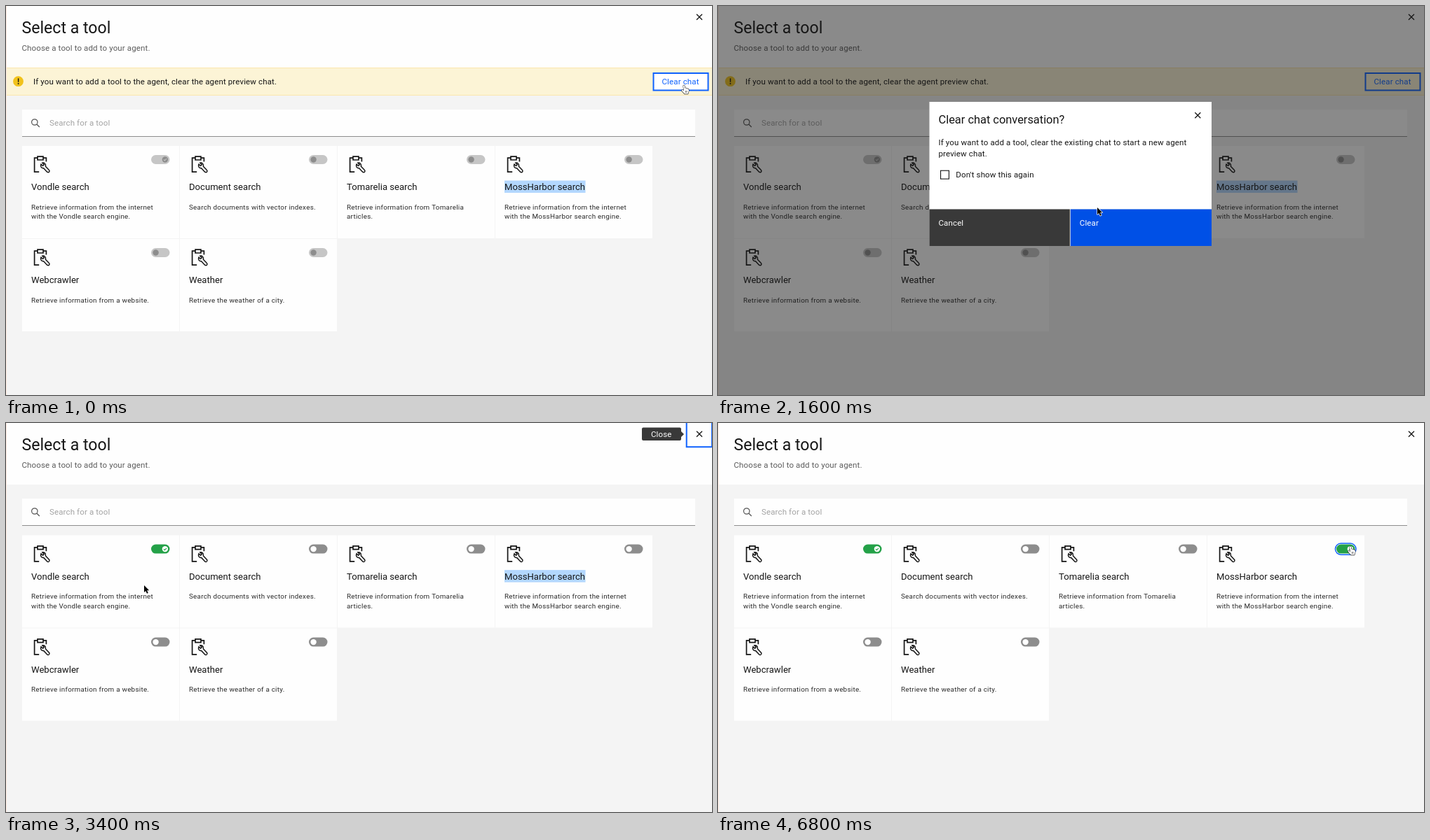
Recreate the animation shown at these times as an HTML page with a canvas. Size 1007 by 556 pixels, loop 7000 ms.

```html
<!DOCTYPE html>
<html lang="en">
<head>
<meta charset="utf-8">
<title>Select a tool</title>
<style>
html, body { margin: 0; width: 100%; height: 100%; overflow: hidden; background: #f4f4f4; }
canvas { display: block; width: 1007px; height: 556px; }
</style>
</head>
<body>
<canvas id="stage"></canvas>
<script>
const W = 1007, H = 556, LOOP = 7000, STEP = 200;
const BLUE = '#0f62fe', INK = '#161616';
const ratio = window.devicePixelRatio || 1;
const stage = document.getElementById('stage');
const layer = document.createElement('canvas');
for (const c of [stage, layer]) {
  c.width = W * ratio;
  c.height = H * ratio;
  c.getContext('2d').scale(ratio, ratio);
}
const main = stage.getContext('2d');
const over = layer.getContext('2d');
let g = main;

// size and letter spacing of each text style
const STYLES = {
  title: [23.1, 0], dialog: [16.4, 0], card: [13.1, 0], body: [11.5, 0.13], small: [9.85, 0.26]
};

const TOOLS = [
  ['Vondle search', 'Retrieve information from the internet', 'with the Vondle search engine.'],
  ['Document search', 'Search documents with vector indexes.'],
  ['Tomarelia search', 'Retrieve information from Tomarelia', 'articles.'],
  ['MossHarbor search', 'Retrieve information from the internet', 'with the MossHarbor search engine.'],
  ['Webcrawler', 'Retrieve information from a website.'],
  ['Weather', 'Retrieve the weather of a city.']
];

// time, x, y of the pointer tip
const PATH = [
  [0, 966, 113], [1200, 966, 113], [1600, 541, 288], [2000, 578, 322], [2400, 583, 328],
  [3000, 583, 328], [3400, 197, 232], [3800, 202, 226], [4800, 646, 201], [5200, 901, 176], [7000, 901, 176]
];

function setFont(style) {
  const [size, gap] = STYLES[style];
  g.font = `${size}px Roboto, "Noto Sans", sans-serif`;
  g.letterSpacing = gap + 'px';
}

function text(str, x, y, style = 'body', color = INK) {
  setFont(style);
  g.fillStyle = color;
  g.fillText(str, x, y);
}

function box(x, y, w, h, color) {
  g.fillStyle = color;
  g.fillRect(x, y, w, h);
}

function frame(x, y, w, h, color, width) {
  g.strokeStyle = color;
  g.lineWidth = width;
  g.strokeRect(x + width / 2, y + width / 2, w - width, h - width);
}

function disc(x, y, r, color) {
  g.fillStyle = color;
  g.beginPath();
  g.arc(x, y, r, 0, 7);
  g.fill();
}

function pill(x, y, w, h, color, r = h / 2) {
  g.fillStyle = color;
  g.beginPath();
  g.roundRect(x, y, w, h, r);
  g.fill();
}

function line(d, color, width) {
  g.strokeStyle = color;
  g.lineWidth = width;
  g.stroke(new Path2D(d));
}

function cross(x, y) {
  line(`M${x - 4} ${y - 4}l8 8m0 -8l-8 8`, INK, 1.3);
}

function toggle(x, y, on, enabled, focus) {
  if (focus) {
    pill(x - 2.3, y - 2.3, 31.1, 17.6, BLUE);
    pill(x - 0.8, y - 0.8, 28.1, 14.6, '#fff');
  }
  const track = !enabled ? '#c6c6c6' : on ? '#24a148' : '#8d8d8d';
  pill(x, y, 26.5, 13, track);
  const cx = x + (on ? 19.9 : 6.6), cy = y + 6.5;
  disc(cx, cy, 4.2, enabled ? '#fff' : '#8d8d8d');
  if (on) line(`M${cx - 2} ${cy}l1.5 1.5l2.6 -2.8`, track, 1.1);
}

function toolIcon(x, y) {
  g.save();
  g.translate(x, y);
  line('M6 3.2H1.6V23.2H8.2M14 3.2H18.4V8.6M6 1.2H14V6H6Z', INK, 1.7);
  line('M12.9 10.2L15.2 12.8L13.6 14.5L11 12.2C9.6 15 11.4 18.2 14.6 17.8L19.6 23.2Q21.4 24.6 22.6 23Q23.6 21.6 22.2 20.3L17.4 15.2C18.2 12 15.6 9.6 12.9 10.2Z', INK, 1.5);
  g.restore();
}

function card([name, ...desc], i, top, s) {
  const x = 23 + (i % 4) * 225, y = top + (i > 3 ? 133 : 0);
  const last = i === 3;
  box(x, y, 224, 132, '#fefefe');
  toolIcon(x + 16, y + 14);
  toggle(x + 184, y + 13, i === 0 || (last && s.added), s.cleared, last && s.added);
  if (last && !s.added) {
    setFont('card');
    box(x + 13, y + 49.5, g.measureText(name).width + 0.5, 17.5, '#b3d7fe');
  }
  text(name, x + 13, y + 63, 'card');
  desc.forEach((row, n) => text(row, x + 13, y + 90.5 + n * 13.5, 'small', '#2a2a2a'));
}

function banner(s) {
  box(0, 88, W, 40, '#fcf4d6');
  frame(0, 88, W + 2, 40, '#fbe6ae', 1);
  disc(17.5, 107.7, 7.4, '#f1c21b');
  box(16.9, 103.4, 1.4, 5.4, INK);
  disc(17.6, 111, 0.95, INK);
  text('If you want to add a tool to the agent, clear the agent preview chat.', 39, 112);
  if (!s.closeFocus) {
    if (s.chatHover) box(923, 95, 79, 26, '#fff');
    frame(922.5, 95, 80, 26.5, BLUE, 2);
  }
  text('Clear chat', 935.5, 112, 'body', BLUE);
}

function closeButton(focus) {
  if (focus) {
    frame(969.7, -3, 38.3, 38.2, BLUE, 2);
    pill(907, 6.6, 56, 18.4, '#393939', 2);
    g.fill(new Path2D('M963 12L967 16L963 20Z'));
    text('Close', 920, 20, 'body', '#fff');
  }
  cross(989, 15.8);
}

function page(s) {
  box(0, 0, W, H, '#f4f4f4');
  box(0, 0, W, 88, '#fefefe');
  text('Select a tool', 22.5, 39, 'title');
  text('Choose a tool to add to your agent.', 22.5, 64.3, 'body', '#5c5c5c');
  if (!s.cleared) banner(s);
  box(0, 0, 1, H, '#fce9df');
  closeButton(s.closeFocus);

  const y = s.cleared ? 108 : 148;
  box(23, y, 960, 39, '#fefefe');
  box(23, y + 38, 960, 1, '#8d8d8d');
  line(`M45 ${y + 18}a4.2 4.2 0 1 1 -8.4 0a4.2 4.2 0 1 1 8.4 0M43.8 ${y + 21}l4 4`, '#525252', 1.2);
  text('Search for a tool', 62, y + 23.3, 'body', '#a3a3a3');
  TOOLS.forEach((tool, i) => card(tool, i, s.cleared ? 160.6 : 200, s));
}

function dialog(s) {
  g = over;
  g.clearRect(0, 0, W, H);
  box(0, 0, W, H, 'rgba(22,22,22,0.5)');
  g.save();
  g.translate(0, s.rise);
  box(301.5, 137, 402.5, 154, '#fff');
  text('Clear chat conversation?', 314.5, 167.5, 'dialog');
  cross(684.3, 156.2);
  text('If you want to add a tool, clear the existing chat to start a new agent', 314.5, 198.7);
  text('preview chat.', 314.5, 215);
  frame(317, 234.7, 13, 13, INK, 1.1);
  text("Don't show this again", 339.3, 244.7);
  box(301.5, 290.5, 402.5, 52.5, '#e0e0e0');
  box(301.5, 290.5, 200.3, 52.5, '#393939');
  box(502.8, 290.5, 201.2, 52.5, s.clearColor);
  text('Cancel', 314.5, 314.3, 'body', '#fff');
  text('Clear', 515.8, 314.3, 'body', '#fff');
  g.restore();
  g = main;
  g.globalAlpha = s.fade;
  g.drawImage(layer, 0, 0, W, H);
  g.globalAlpha = 1;
}

function pointer(x, y, hand) {
  g.save();
  g.translate(x, y);
  g.lineJoin = 'round';
  const shape = new Path2D(hand
    ? 'M0 1Q1 -0.5 2 1L2.5 4.6Q4 3.8 4.6 5Q6 4.5 6.5 5.7Q8 5.4 8 7.2L7.5 10L6.7 12.6H1.8L-2.4 7.8Q-2.4 6.4 -0.8 6.9L0.8 8.3Z'
    : 'M0 0V10L2.3 8L4 11.8L5.8 11L4.1 7.3H7.2Z');
  g.strokeStyle = hand ? '#222' : '#fff';
  g.lineWidth = hand ? 1.1 : 1.4;
  g.fillStyle = hand ? '#fff' : '#000';
  g.stroke(shape);
  g.fill(shape);
  if (hand) line('M3.4 8.2V10.8M5 8.2V10.8', '#333', 0.7);
  g.restore();
}

function pointerAt(t) {
  const i = PATH.findIndex(p => p[0] > t);
  const [t0, x0, y0] = PATH[i - 1], [t1, x1, y1] = PATH[i];
  const k = (t - t0) / (t1 - t0);
  return [x0 + (x1 - x0) * k, y0 + (y1 - y0) * k];
}

function stateAt(t) {
  return {
    open: t >= 200 && t < 3200,
    fade: t < 400 ? 0.87 : 1,
    rise: t < 400 ? -2.5 : 0,
    chatHover: t < 1400,
    clearColor: t < 1600 ? BLUE : t < 3000 ? '#0050e6' : '#0037b4',
    closeFocus: t >= 3000 && t < 5400,
    cleared: t >= 3200,
    added: t >= 5400,
    hand: t < 1400 || (t >= 1800 && t < 3200) || t >= 5200
  };
}

function draw(now) {
  const t = Math.floor((now % LOOP) / STEP) * STEP;
  const s = stateAt(t);
  page(s);
  if (s.open) dialog(s);
  pointer(...pointerAt(t), s.hand);
}

let start;
function tick(now) {
  start ??= now;
  draw(Math.max(0, now - start));
  requestAnimationFrame(tick);
}
draw(0);
requestAnimationFrame(tick);
</script>
</body>
</html>
```
